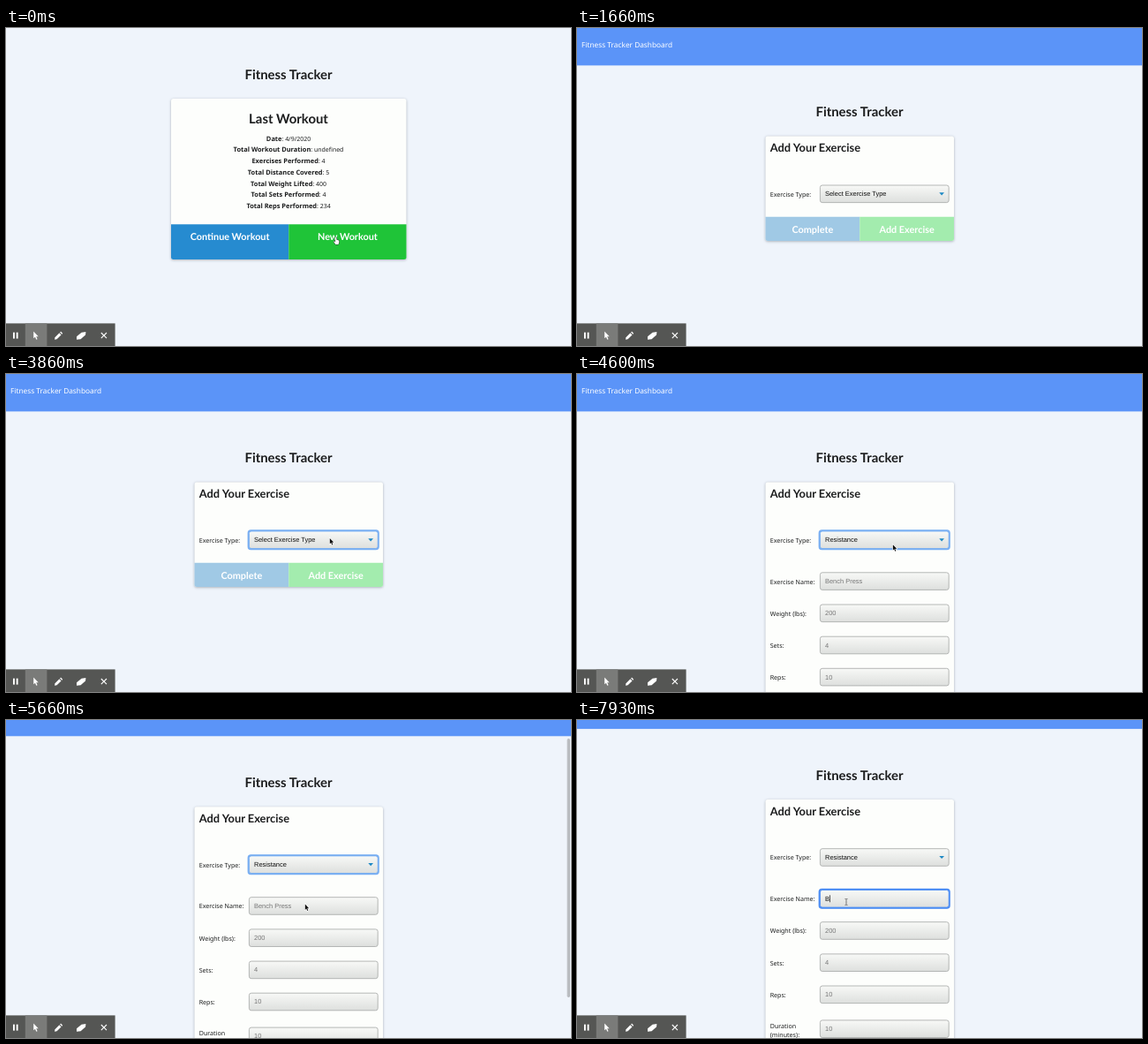
Write an HTML page with a canvas that moves like this. It is 640x360 px and loops after 8 s.

```html
<!DOCTYPE html>
<html lang="en">
<head>
<meta charset="utf-8">
<title>Fitness Tracker</title>
<style>
html, body { margin: 0; height: 100%; overflow: hidden; background: #eff4fb }
canvas { display: block }
</style>
</head>
<body>
<canvas id="stage" width="640" height="360"></canvas>
<script>
const c = document.getElementById('stage').getContext('2d');
const LOOP = 8000, TICK = 200 / 3;
const HEAD = 'Lato, sans-serif', BODY = '"Noto Sans", sans-serif', FIELD = '"Liberation Sans", Arial, sans-serif';
const BLUE = '#268bd0', INK = '#1c1d1e';

const clamp = v => Math.max(0, Math.min(1, v));
const ease = v => { v = clamp(v); return v * v * (3 - 2 * v); };
const mix = (a, b, p) => a + (b - a) * p;

function text(s, x, y, font, color = INK, align = 'left') {
  c.font = font;
  c.textRendering = 'geometricPrecision';
  c.fillStyle = color;
  c.textAlign = align;
  c.fillText(s, x, y);
}

const heading = (s, x, y, size, color, align = 'center') => text(s, x, y, `bold ${size}px ${HEAD}`, color, align);

function rect(x, y, w, h, color) {
  c.fillStyle = color;
  c.fillRect(x, y, w, h);
}

function roundBox(x, y, w, h, r, fill, stroke, line = 1) {
  c.beginPath();
  c.roundRect(x, y, w, h, r);
  if (fill) { c.fillStyle = fill; c.fill(); }
  if (stroke) { c.strokeStyle = stroke; c.lineWidth = line; c.stroke(); }
}

function shape(points, fill, stroke, line = 1) {
  c.beginPath();
  points.forEach(([x, y]) => c.lineTo(x, y));
  c.closePath();
  if (stroke) { c.strokeStyle = stroke; c.lineWidth = line; c.stroke(); }
  if (fill) { c.fillStyle = fill; c.fill(); }
}

function card(x, y, w, h) {
  c.save();
  c.shadowColor = 'rgba(60,70,80,.4)';
  c.shadowBlur = 3;
  c.shadowOffsetY = .7;
  roundBox(x, y, w, h, 2.5, '#fdfefc');
  c.restore();
}

// Two half-width buttons along the foot of a card
function buttons(x, y, w, h, colors, labels, textY) {
  roundBox(x, y, w / 2, h, [0, 0, 0, 2.5], colors[0]);
  roundBox(x + w / 2, y, w / 2, h, [0, 0, 2.5, 0], colors[1]);
  labels.forEach((s, i) => heading(s, x + w * (.25 + i / 2), textY, 10.85, '#fff'));
}

function summary(t) {
  heading('Fitness Tracker', 320, 57.6, 14.9);
  card(187, 80, 266.5, 182);
  heading('Last Workout', 320, 108.2, 14.9);
  const rows = [['Date', '4/9/2020'], ['Total Workout Duration', 'undefined'], ['Exercises Performed', 4],
    ['Total Distance Covered', 5], ['Total Weight Lifted', 400], ['Total Sets Performed', 4], ['Total Reps Performed', 234]];
  const bold = `bold 7.45px ${BODY}`, plain = `6.95px ${BODY}`;
  rows.forEach(([key, value], i) => {
    const rest = ': ' + value, y = 127.6 + i * 12.75;
    c.font = bold;
    const keyWidth = c.measureText(key).width;
    c.font = plain;
    const x = 320 - (keyWidth + c.measureText(rest).width) / 2;
    text(key, x, y, bold);
    text(rest, x + keyWidth, y, plain);
  });
  const p = clamp((t - 60) / 270);
  const green = `rgb(${mix(31, 24, p)},${mix(196, 188, p)},${mix(56, 49, p)})`;
  buttons(187, 222.3, 266.5, 39.7, [BLUE, green], ['Continue Workout', 'New Workout'], 240.4);
  if (t < 1260) hand(374, 237);
}

function field(mid, value, color, ring) {
  const g = c.createLinearGradient(0, mid - 10, 0, mid + 10);
  g.addColorStop(0, '#f8f9f7');
  g.addColorStop(1, '#dddfdd');
  if (ring) roundBox(274.2, mid - 10.9, 148, 21.8, 3.2, ring, ring, 1.2);
  roundBox(275.4, mid - 9.8, 145.8, 19.6, 2.5, g, ring || '#adafae', .9);
  text(value, 281, mid + 2.5, `7.46px ${FIELD}`, color);
}

const label = (s, y) => text(s, 218.7, y, `7.1px ${BODY}`);

function form(t) {
  const open = t >= 4260, clicked = t >= 6190, typed = t >= 7920;
  const scroll = t < 5530 ? 0 : .7 + 31.6 * ease((t - 5533.3) / 200);
  c.save();
  c.translate(0, -scroll);
  rect(0, 0, 640, 42.4, '#5b94f8');
  text('Fitness Tracker Dashboard', 5, 22.3, `8.3px ${BODY}`, '#fff');
  heading('Fitness Tracker', 320, 100.4, 14.9);
  card(213.5, 122.4, 213.5, open ? 310 : 118.6);
  heading('Add Your Exercise', 218.7, 140.2, 12.85, INK, 'left');
  label('Exercise Type:', 190.7);
  field(187.8, open ? 'Resistance' : 'Select Exercise Type', '#111', t >= 2800 && !clicked && '#78aef2');
  shape([[410.3, 186.2], [416, 186.2], [413.15, 189.4]], '#1c88c4');
  if (open) {
    const rows = [['Exercise Name:', 'Bench Press', 234.6], ['Weight (lbs):', '200', 270.8],
      ['Sets:', '4', 307], ['Reps:', '10', 343.1], ['Duration', '10', 382]];
    rows.forEach(([name, hint, mid], i) => {
      label(name, mid + (i == 4 ? -.5 : 3));
      const isB = typed && !i;
      field(mid, isB ? 'B' : hint, isB ? '#111' : '#777', clicked && !i && '#4c8df4');
    });
    label('(minutes):', 391);
    const caretOn = clicked && (t < 6730 || t >= 7260 && t < 7730 || typed);
    if (caretOn) rect(typed ? 286 : 281, 230.6, .7, 8, '#111');
  } else {
    buttons(213.5, 213.7, 213.5, 27.3, ['#a0c9e5', '#a3ecae'], ['Complete', 'Add Exercise'], 231.9);
  }
  c.restore();

  if (t >= 5590 && t < 6460) {
    c.globalAlpha = clamp((6533 - t) / 133);
    roundBox(635.6, 1 + scroll * .83, 3.4, 293, 1.7, '#b9bcc0');
    c.globalAlpha = 1;
  }
  pointer(t);
}

function pointer(t) {
  if (t < 1860) return;
  if (t < 4260) {
    const p = ease((t - 2133) / 533);
    arrow(mix(373, 366.8, p), mix(232, 186, p));
  } else if (t < 5730) {
    const p = ease((t - 4200) / 1060);
    arrow(mix(366.8, 338.8, p), mix(186, 208.6, p));
  } else {
    const p = ease((t - 5866) / 330), x = mix(339, 305, p), y = mix(211, 206, p);
    beam(x, y);
    if (t >= 6190 && t < 6460) {
      c.beginPath();
      c.arc(x, y, 8.8, 0, 7);
      c.strokeStyle = '#e0526a';
      c.lineWidth = 1;
      c.stroke();
    }
  }
}

function arrowPoints(x, y, k) {
  return [[0, 0], [0, 6.3], [1.4, 5], [2.5, 7.5], [3.5, 7], [2.4, 4.7], [4.4, 4.6]].map(([a, b]) => [x + a * k, y + b * k]);
}

const arrow = (x, y) => shape(arrowPoints(x, y, 1), '#111', '#fff', 1.2);

function hand(x, y) {
  shape([[-.9, 0], [.2, 0], [.5, 2.8], [3, 3.4], [3.4, 5], [2.5, 8], [-.6, 8], [-2.8, 5], [-2.2, 4.3], [-.9, 5.2]]
    .map(([a, b]) => [x + a, y + b]), '#fff', '#333', 1);
}

function beam(x, y) {
  rect(x - .4, y - 3.5, .8, 7, '#555');
  rect(x - 1.7, y - 4, 3.4, .7, '#777');
  rect(x - 1.7, y + 3.3, 3.4, .7, '#777');
}

function toolbar() {
  rect(0, 334.4, 123.6, 26, '#555654');
  rect(21.8, 334.4, 24.6, 26, '#7a7b79');
  rect(8, 344.6, 1.9, 7, '#fff');
  rect(11.7, 344.6, 1.9, 7, '#fff');
  shape(arrowPoints(31.2, 343.4, 1.25), '#fff');
  shape([[55, 352.8], [55.5, 350.2], [60.4, 345.3], [62.5, 347.4], [57.6, 352.3]], '#fff');
  shape([[61.1, 344.6], [62.1, 343.6], [64.2, 345.7], [63.2, 346.7]], '#fff');
  shape([[80, 349.2], [85.5, 344.8], [90.4, 343.9], [90, 347.6], [84.6, 352.2], [80, 352.8]], '#fff');
  c.strokeStyle = '#fff';
  c.lineWidth = 1.1;
  c.beginPath();
  c.moveTo(107.8, 345); c.lineTo(114, 351.2);
  c.moveTo(114, 345); c.lineTo(107.8, 351.2);
  c.stroke();
}

const start = performance.now();

function draw() {
  const elapsed = (performance.now() - start) % LOOP;
  const t = Math.floor((elapsed + 7) / TICK) * TICK;
  rect(0, 0, 640, 360, '#eff4fb');
  (t < 1530 ? summary : form)(t);
  toolbar();
  requestAnimationFrame(draw);
}
draw();
</script>
</body>
</html>
```
